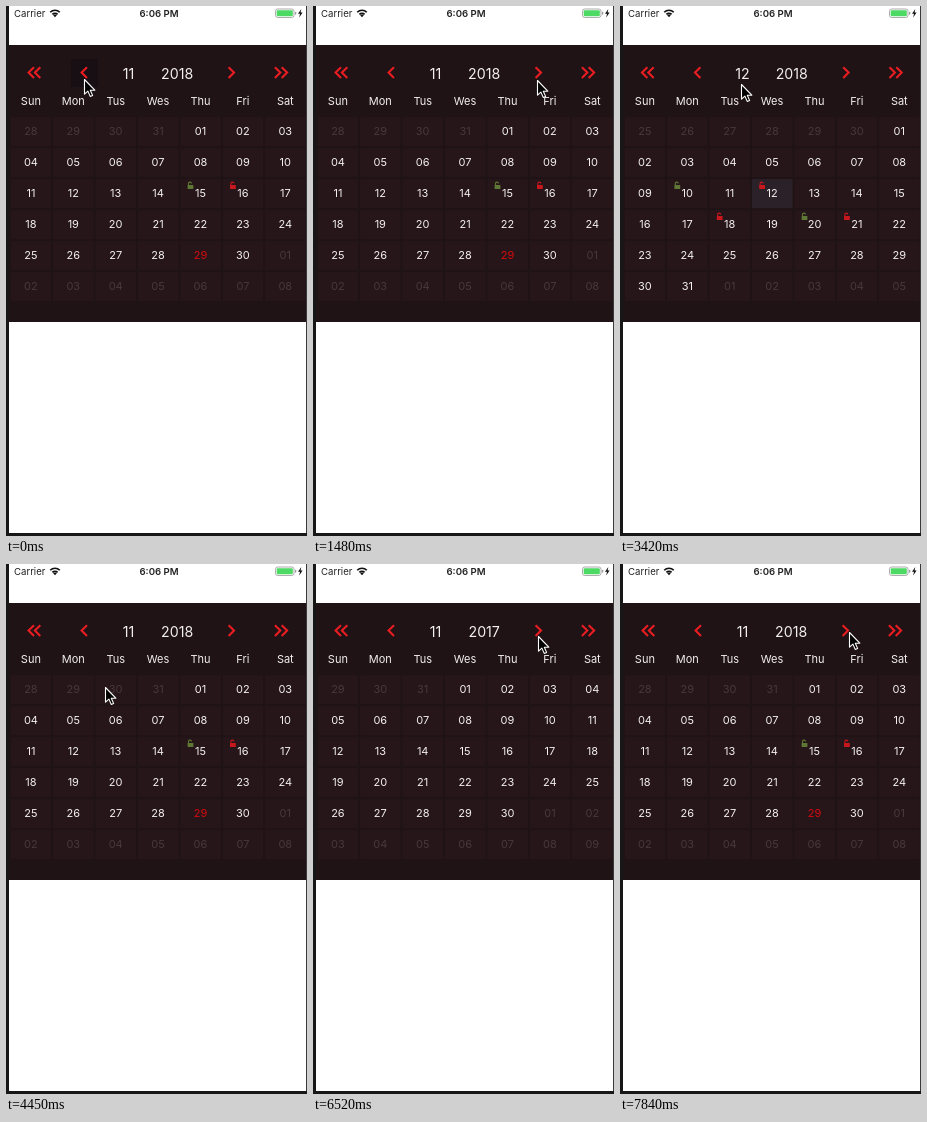
An HTML page for the animation above (7.99 s loop, 301 by 530 pixels).

```html
<!DOCTYPE html>
<html lang="en">
<head>
<meta charset="utf-8">
<title>Calendar</title>
<style>
  html, body { margin: 0; width: 100%; height: 100%; overflow: hidden; background: #fff; }
  svg { display: block; width: 100%; height: 100%; }
  text { font-family: Inter, Roboto, sans-serif; font-size: 11px; fill: #f3efef; text-anchor: middle; }
  .title { font-size: 14.2px; }
  .status { font-size: 9.6px; fill: #222; }
  .dim { fill: #47383b; }
  .today { fill: #d5090f; }
  .chevron { fill: none; stroke: #e91d22; stroke-width: 2.1; }
</style>
</head>
<body>
<svg id="stage" viewBox="0 0 301 530"></svg>
<script>
const LOOP = 7990;
const stage = document.getElementById('stage');

function add(parent, tag, attrs, content) {
  const node = document.createElementNS('http://www.w3.org/2000/svg', tag);
  for (const key in attrs) node.setAttribute(key, attrs[key]);
  if (content !== undefined) node.textContent = content;
  return parent.appendChild(node);
}
const rect = (parent, x, y, width, height, fill, rx = 0) =>
  add(parent, 'rect', { x, y, width, height, fill, rx });
const label = (parent, x, y, content, cls = '') =>
  add(parent, 'text', { x, y, class: cls }, content);

const colX = col => 24.9 + col * 42.4;
const rowY = row => 125.4 + row * 31;

function drawPhone() {
  rect(stage, 0, 0, 301, 530, '#fff');
  rect(stage, 3, 39, 298, 277, '#1f1316');
  rect(stage, 0, 0, 3, 530, '#171717');
  rect(stage, 300, 0, 1, 530, '#3a3a3a');
  rect(stage, 0, 527, 301, 3, '#171717');

  label(stage, 8, 10.5, 'Carrier', 'status').style.textAnchor = 'start';
  label(stage, 153, 10.5, '6:06 PM', 'status').style.fontWeight = 600;

  // Wi-Fi arcs
  for (const r of [3.6, 6.6]) {
    const d = r * 0.72;
    add(stage, 'path', { d: `M${49 - d} ${11 - d}A${r} ${r} 0 0 1 ${49 + d} ${11 - d}`,
      fill: 'none', stroke: '#111', 'stroke-width': 1.7 });
  }
  add(stage, 'path', { d: 'M49 11.2L47.2 9.3Q49 7.9 50.8 9.3Z', fill: '#111' });

  // Battery and charging bolt
  add(stage, 'rect', { x: 269.5, y: 3, width: 18.5, height: 8.5, rx: 2.2,
    fill: 'none', stroke: '#999', 'stroke-width': 0.8 });
  rect(stage, 270.7, 4.2, 16.1, 6.1, '#4cd964', 1);
  rect(stage, 289, 5.7, 1.2, 3, '#999', 0.6);
  add(stage, 'path', { d: 'M295.3 3L292 7.8H294L293.2 11.5L296.6 6.5H294.6Z', fill: '#111' });

  'Sun Mon Tus Wes Thu Fri Sat'.split(' ').forEach((day, col) => label(stage, colX(col), 99.3, day));
  for (let i = 0; i < 42; i++) {
    rect(stage, colX(i % 7) - 20.2, rowY(Math.floor(i / 7)) - 14.2, 40.6, 29, '#261619');
  }
}

function chevron(parent, x, dir) {
  add(parent, 'path', { class: 'chevron', d: `M${x - 2.7 * dir} 61.3L${x + 2.7 * dir} 66.6L${x - 2.7 * dir} 71.9` });
}

function lock(parent, x, y, color) {
  const icon = add(parent, 'g', { transform: `translate(${x - 13.4} ${y - 11.4})` });
  rect(icon, 0.5, 3, 5.8, 4, color, 0.5);
  add(icon, 'path', { d: 'M1.4 3.4V1.7A1.5 1.5 0 0 1 4.4 1.5', fill: 'none', stroke: color, 'stroke-width': 1.1 });
}

function drawMonth({ year, month, shift = 0, green = [], red = [], today, picked }) {
  const view = add(stage, 'g', { visibility: 'hidden' });
  chevron(view, 25.3 - shift, -1);
  chevron(view, 31.6 - shift, -1);
  chevron(view, 78.3 - shift, -1);
  chevron(view, 225.3 + shift, 1);
  chevron(view, 271.6 + shift, 1);
  chevron(view, 278.4 + shift, 1);
  label(view, 122.5, 73, month, 'title');
  label(view, 171.2 + shift, 73, year, 'title');

  const lead = new Date(year, month - 1, 1).getDay();
  for (let i = 0; i < 42; i++) {
    const date = new Date(year, month - 1, 1 - lead + i);
    const day = date.getDate(), inside = date.getMonth() === month - 1;
    const x = colX(i % 7), y = rowY(Math.floor(i / 7));
    if (inside && day === picked) rect(view, x - 20.2, y - 14.2, 40.6, 29, '#2b2229');
    if (inside && green.includes(day)) lock(view, x, y, '#5f7734');
    if (inside && red.includes(day)) lock(view, x, y, '#c8171d');
    label(view, x, y + 4, String(day).padStart(2, '0'), !inside ? 'dim' : day === today ? 'today' : '');
  }
  return view;
}

drawPhone();
const press = rect(stage, 65, 53, 27, 28, '#170f13');
const views = {
  oct: drawMonth({ year: 2018, month: 10, shift: 0.6 }),
  nov: drawMonth({ year: 2018, month: 11, green: [15], red: [16], today: 29 }),
  dec: drawMonth({ year: 2018, month: 12, shift: 0.6, green: [10, 20], red: [12, 18, 21], picked: 12 }),
  lastYear: drawMonth({ year: 2017, month: 11 })
};
const cursor = add(stage, 'path', {
  d: 'M.5 .5V15.2L3.9 12.1L6.2 17.4L8.6 16.4L6.3 11.2H10.8Z',
  fill: '#000', stroke: '#fff', 'stroke-width': 1.1, 'stroke-linejoin': 'round'
});

const pages = [[0, 'nov'], [140, 'oct'], [1480, 'nov'], [2530, 'dec'], [4010, 'nov'], [5630, 'lastYear'], [7100, 'nov']];

// Pointer tip: time, x, y
const moves = [
  [0, 78, 73],
  [440, 88, 75], [590, 118, 79], [740, 160, 81], [890, 198, 79], [1030, 218, 76], [1180, 224, 74],
  [3120, 208, 75], [3270, 166, 78], [3420, 121, 78], [3570, 90, 74], [3710, 78, 71],
  [4150, 80, 76], [4300, 87, 95], [4450, 99, 123], [4600, 112, 149], [4740, 117, 158],
  [4890, 104, 139], [5040, 76, 105], [5180, 44, 73], [5330, 31, 62],
  [6230, 62, 65], [6380, 146, 70], [6520, 225, 72], [6670, 262, 71], [6810, 273, 70],
  [7550, 262, 69], [7700, 241, 68], [7840, 229, 68]
];
const at = (steps, time) => steps.findLast(step => step[0] <= time);

function render(now) {
  const time = now % LOOP;
  const page = at(pages, time)[1];
  for (const name in views) views[name].setAttribute('visibility', name === page ? 'visible' : 'hidden');
  const pressed = time < 140 || (time >= 3860 && time < 4010);
  press.setAttribute('visibility', pressed ? 'visible' : 'hidden');
  const [, x, y] = at(moves, time);
  cursor.setAttribute('transform', `translate(${x} ${y})`);
}

const start = performance.now();
function tick() {
  render(performance.now() - start);
  requestAnimationFrame(tick);
}
tick();
</script>
</body>
</html>
```
